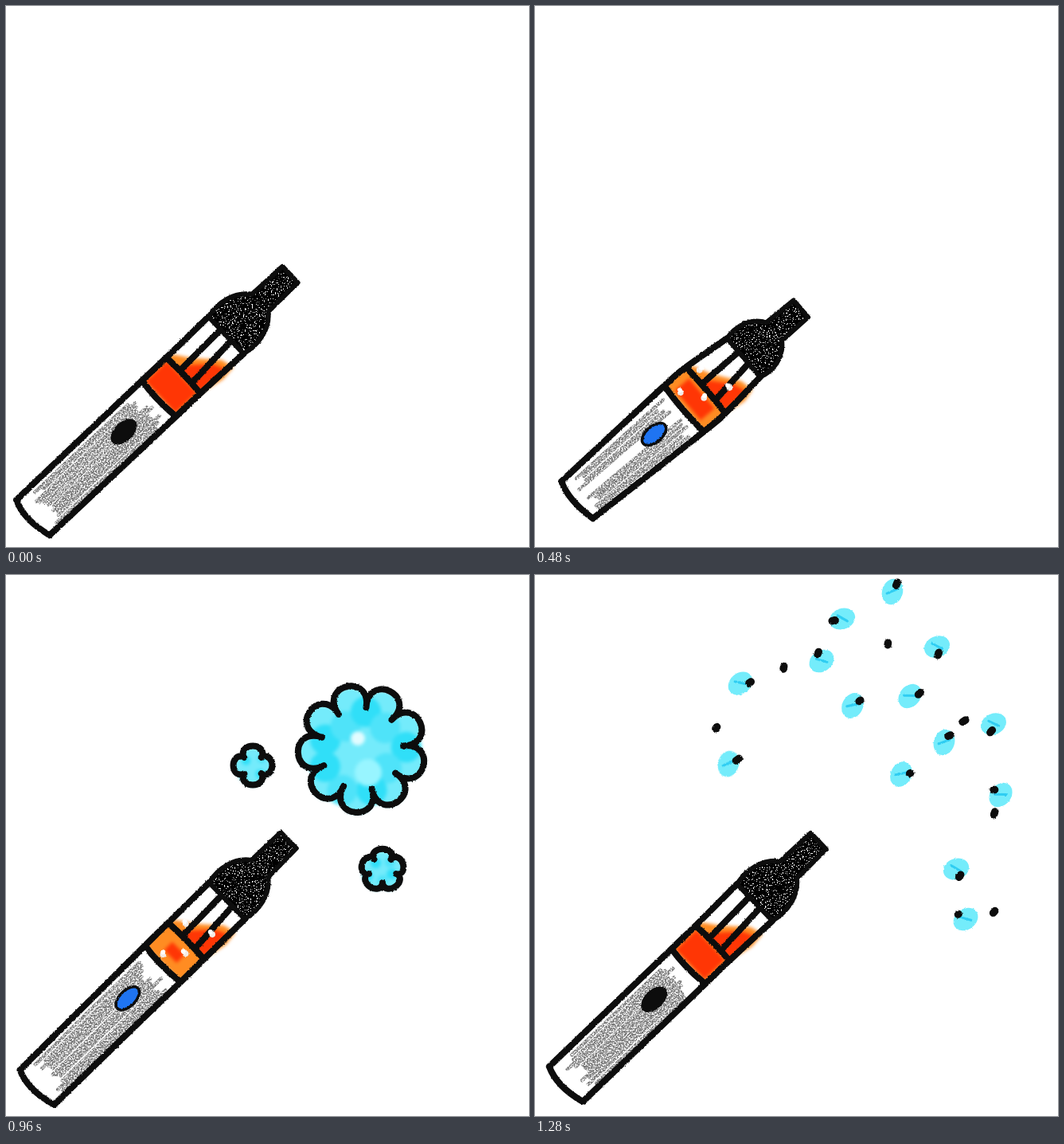
Write an HTML page that moves like this. It is 657 px wide and 679 px high and loops after 1360 ms.

```html
<!DOCTYPE html>
<html lang="en">
<head>
<meta charset="utf-8">
<title>Vape puff</title>
<style>
  html, body { margin: 0; width: 100%; height: 100%; overflow: hidden; background: #fff; }
  svg { display: block; width: 100vw; height: 100vh; }
</style>
</head>
<body>
<svg id="stage" viewBox="0 0 657 679" fill="none" stroke-linecap="round" stroke-linejoin="round"></svg>
<script>
const STEP = 80, STEPS = 17, INK = '#0d0d0d';
const stage = document.getElementById('stage');

// step, foot x y, tip x y, collar place along the pen, half width there, heat of the liquid
const poses = [
  [0, 34, 642, 357, 337, .49, 31, .88],
  [4, 39, 643, 355, 333, .5, 32, .45],
  [8, 67, 597, 313, 427, .455, 44, .85],
  [10, 52, 605, 377, 348, .41, 34, .6],
  [12, 39, 643, 355, 333, .5, 32, .35],
  [14, 41, 636, 356, 331, .485, 32, .85],
  [16, 39, 639, 356, 334, .485, 30.5, .85]
];

// Broken clouds: centre, radii, number of lobes, angle of the first notch
const shreds = [
  { x: 428, y: 135, rx: 46, ry: 62, n: 6, turn: -94 },
  { x: 515, y: 258, rx: 80, ry: 46, n: 6, turn: 215 },
  { x: 285, y: 231, rx: 30, ry: 27, n: 5, turn: -90 },
  { x: 492, y: 387, rx: 31, ry: 28, n: 5, turn: -90 }
];

const droplets = [[449, 21], [386, 55], [505, 90], [360, 108], [258, 136], [399, 164], [471, 152],
  [514, 210], [576, 187], [243, 237], [460, 250], [585, 276], [529, 369], [541, 432]];

const lerp = (a, b, t) => a + (b - a) * t;
const mix = (a, b, t) => a.map((v, i) => lerp(v, b[i], t));
const fix = n => Math.round(n * 10) / 10;
const at = p => fix(p[0]) + ' ' + fix(p[1]);
const poly = pts => 'M' + pts.map(at).join('L');
const path = (d, attrs) => `<path d="${d}" ${attrs}/>`;
const ink = (d, w = 8) => path(d, `stroke="${INK}" stroke-width="${w}"`);
const dot = (x, y, r, fill) => `<circle cx="${fix(x)}" cy="${fix(y)}" r="${fix(r)}" fill="${fill}"/>`;
const group = (body, attrs) => `<g ${attrs}>${body}</g>`;
const use = name => `filter="url(#${name})"`;
const soft = body => group(body, use('soft'));
const rough = body => group(body, use('rough'));

function polar(x, y, rx, ry, degrees) {
  const a = degrees * Math.PI / 180;
  return [x + rx * Math.cos(a), y + ry * Math.sin(a)];
}

function random(seed) {
  let s = seed * 7919 + 17;
  return () => (s = (s * 16807) % 2147483647) / 2147483647;
}

function poseAt(step) {
  const i = Math.max(1, poses.findIndex(p => p[0] >= step));
  const from = poses[i - 1], to = poses[i];
  return mix(from, to, (step - from[0]) / (to[0] - from[0])).slice(1);
}

// Point inside a four-cornered patch: u along the pen, v across it
const patch = ([a, b], [c, d]) => (u, v) => mix(mix(a, b, v), mix(c, d, v), u);

function smooth(pts) {
  let d = 'M' + at(pts[0]);
  for (let i = 0; i < pts.length - 1; i++) {
    const p = pts[i], n = pts[i + 1], prev = pts[i - 1] || p, next = pts[i + 2] || n;
    const c1 = [p[0] + (n[0] - prev[0]) / 6, p[1] + (n[1] - prev[1]) / 6];
    const c2 = [n[0] - (next[0] - p[0]) / 6, n[1] - (next[1] - p[1]) / 6];
    d += `C${at(c1)} ${at(c2)} ${at(n)}`;
  }
  return d;
}

function filters(step) {
  const area = 'filterUnits="userSpaceOnUse" x="0" y="0" width="657" height="679" color-interpolation-filters="sRGB"';
  const noise = f => `<feTurbulence type="fractalNoise" baseFrequency="${f}" numOctaves="2" seed="${step + 3}" result="n"/>`;
  const grain = (id, gain, lift) => `<filter id="${id}" ${area}>${noise(.55)}
    <feColorMatrix in="n" values="0 0 0 0 0 0 0 0 0 0 0 0 0 0 0 0 0 0 ${gain} ${lift}" result="m"/>
    <feComposite in="SourceGraphic" in2="m" operator="in"/></filter>`;
  const edge = `<filter id="rough" ${area}>${noise(.4)}
    <feDisplacementMap in="SourceGraphic" in2="n" scale="2.5" xChannelSelector="R" yChannelSelector="G"/>
    <feGaussianBlur stdDeviation=".6"/></filter>`;
  const blur = `<filter id="soft" ${area}><feGaussianBlur stdDeviation="2.2"/></filter>`;
  return '<defs>' + grain('speck', -14, 9.7) + grain('pencil', -3.5, 2.4) + edge + blur + '</defs>';
}

function hatch(body, step) {
  const rnd = random(step + 5);
  let d = '';
  for (let v = .14; v < .9; v += .075) {
    if (step > 2 && step < 12 && Math.abs(v - .48) < .08) continue;
    const slip = rnd() * .03;
    d += poly([body(.06 + rnd() * .1, v + slip), body(.5, v + slip), body(.84 + rnd() * .1, v + .02)]);
  }
  return group(path(d, 'stroke="#757575" stroke-width="4.6"'), use('pencil'));
}

function bubbles(step, ring, glass) {
  if (step < 6 || step > 12) return '';
  const rnd = random(step);
  let out = '';
  for (let i = 0; i < 4; i++) {
    const v = .15 + rnd() * .3 + (i % 2) * .4;
    const [x, y] = i < 2 ? ring(.2 + rnd() * .6, v) : glass(.1 + v * .4, v);
    out += dot(x, y, 3.8, '#f3ece8') + dot(x + 3 - rnd() * 6, y - 3, 3, '#fff');
  }
  return out;
}

function pen(step) {
  const [fx, fy, tx, ty, waist, half, heat] = poseAt(step);
  const dx = tx - fx, dy = ty - fy, len = Math.hypot(dx, dy);
  const cut = (u, w) => [-w, w].map(s => [fx + dx * u - dy / len * s, fy + dy * u + dx / len * s]);
  const above = (u, w) => cut(lerp(waist, 1, u), w);

  const foot = cut(0, 30.5), collar = cut(waist, half), band = above(.185, half), top = above(.51, 32);
  const [low, high] = [above(.6, 37), above(.71, 33)], neck = above(.77, 15), tip = above(1, 14);
  const body = patch(foot, collar), ring = patch(collar, band), glass = patch(band, top);

  const liquid = path(poly([collar[0], collar[1], band[1], glass(.45, 1.1), glass(.72, 1.06), glass(.66, .8),
    glass(.3, .35), glass(.12, .05), band[0]]) + 'Z', 'fill="#ff8c22"');
  const a = .5 - heat / 2, b = .5 + heat / 2;
  const hot = path(poly([ring(a, a), ring(a, b), ring(b, b), ring(b, a)]) + 'Z' +
    poly([glass(.03, .3), glass(.03, .97), glass(.6, .98), glass(.5, .74), glass(.22, .45)]) + 'Z', 'fill="#ff3605"');

  const curve = (i, from, c1, c2, to) => `C${at(c1[i])} ${at(c2[i])} ${at(to[i])}`;
  const mouth = 'M' + at(top[0]) + curve(0, top, low, high, neck) + 'L' + at(tip[0]) + 'L' + at(tip[1]) +
    'L' + at(neck[1]) + curve(1, neck, high, low, top) + 'Z';
  const bow = ([p, q], mid) => `M${at(p)}Q${at(mid)} ${at(q)}`;
  const sides = [0, 1].map(i => smooth([foot[i], collar[i], band[i], top[i]])).join('');
  const seams = bow(foot, body(-.05, .4)) + bow(collar, body(.98, .45)) + bow(band, glass(.03, .55));
  const tube = poly([glass(.97, .35), glass(.02, .38)]) + poly([glass(.97, .65), glass(.02, .73)]);

  const angle = Math.atan2(dy, dx) * 180 / Math.PI;
  const button = `<ellipse rx="18" ry="10" transform="translate(${at(body(.72, .5))}) rotate(${fix(angle)})"
    fill="${step > 1 && step < 14 ? '#1f74f2' : INK}" stroke="${INK}" stroke-width="3.5"/>`;

  return hatch(body, step) + soft(liquid + hot) + group(path(mouth, 'fill="#000"'), use('speck')) +
    rough(ink(sides + seams + tube) + ink(mouth, 6) + button + bubbles(step, ring, glass));
}

// Evenly spaced lobes around an ellipse, each as its own arc from notch to notch
function lobes({ x, y, rx, ry, n, turn }, height) {
  return Array.from({ length: n }, (_, i) => {
    const p = polar(x, y, rx, ry, turn + i * 360 / n);
    const q = polar(x, y, rx, ry, turn + (i + 1) * 360 / n);
    const dx = q[0] - p[0], dy = q[1] - p[1], out = height * 4 / 3, flare = height * .3;
    const c1 = [p[0] + dy * out - dx * flare, p[1] - dx * out - dy * flare];
    const c2 = [q[0] + dy * out + dx * flare, q[1] - dx * out + dy * flare];
    return { start: 'M' + at(p), arc: `C${at(c1)} ${at(c2)} ${at(q)}`, notch: poly([p, mix(p, [x, y], .1)]) };
  });
}

function cloud(shape, height) {
  const { x, y, rx, ry, n, turn } = shape, parts = lobes(shape, height), rnd = random(n);
  const edge = parts[0].start + parts.map(p => p.arc).join('') + 'Z';
  let wash = path(edge, 'fill="#74ebfb"');
  for (let i = 0; i < n; i++) {
    const k = .6 + rnd() * .4;
    wash += dot(...polar(x, y, rx * k, ry * k, turn + i * 360 / n), rx * .33, i % 2 ? '#4fe3f9' : '#30dff8');
  }
  if (n > 6) wash += dot(x - 5, y - 15, 9, '#e2fcff') + dot(x + 8, y + 28, 17, '#98f5ff');
  return soft(group(wash, 'transform="translate(0 2)"')) + rough(ink(edge + parts.map(p => p.notch).join('')));
}

function puffs(t) {
  const size = lerp(27, 58, t), big = t > 0;
  let out = cloud({ x: lerp(415, 447, t), y: lerp(306, 218, t), rx: size * lerp(1.14, 1, t), ry: size * lerp(.84, 1, t),
    n: big ? 9 : 5, turn: big ? 196 : 228 }, .65);
  const left = [lerp(343, 310, t), lerp(299, 239, t)], right = [lerp(437, 473, t), lerp(362, 370, t)];
  if (big) {
    out += cloud({ x: left[0], y: left[1], rx: 17 * t, ry: 16 * t, n: 4, turn: -135 }, .55);
    out += cloud({ x: right[0], y: right[1], rx: 20 * t, ry: 18 * t, n: 5, turn: -126 }, .5);
  } else if (t === 0) {
    out += soft(dot(443, 359, 14, '#4fe4fa')) + rough(dot(...left, 7.5, INK) + ink(poly([[421, 364], right])) +
      ink('M430 364Q438 354 448 361Q440 372 430 364', 6));
  }
  return out;
}

// Clouds falling apart: a wash open at the top and arcs trimmed to the given share
function scatter(scale, show) {
  const dash = share => `pathLength="1" stroke-dasharray="0 ${(1 - share) / 2} ${share} 2"`;
  const body = shreds.map(s => {
    const { x, y, rx, ry } = s, r = [rx * .72, ry * .74];
    const from = polar(x, y, ...r, -52), to = polar(x, y, ...r, 232);
    const wash = path(`M${at(from)}A${r.map(fix).join(' ')} 0 1 1 ${at(to)}`, `stroke="#82f0fd" stroke-width="24" ${dash(show)}`);
    const spots = [from, to].map(p => dot(...p, 14 * show, '#3eddf6')).join('');
    const arcs = lobes(s, .3).map(p => path(p.start + p.arc, `stroke="${INK}" stroke-width="7.5" ${dash(show * .82)}`));
    return soft(wash + spots) + rough(arcs.join(''));
  }).join('');
  return group(body, `transform="translate(410 260) scale(${scale}) translate(-410 -260)"`);
}

function spray() {
  const rnd = random(4);
  const nib = (x, y) => ink(`M${fix(x - 1)} ${fix(y + 1)}l${fix(rnd() * 4)} ${fix(-rnd() * 4)}`, 9.5);
  let wash = '', dots = '';
  for (const [x, y] of droplets) {
    wash += group('<ellipse rx="13" ry="16.5" fill="#74ecfb"/>' + path('M-6 4L5 -5', 'stroke="#2fcdf2" stroke-width="3"'),
      `transform="translate(${x} ${y}) rotate(${Math.round(rnd() * 70)})"`);
    dots += nib(...polar(x, y, 12, 10, rnd() * 360));
  }
  for (let i = 0; i < 6; i++) {
    const reach = 170 + rnd() * 110;
    dots += nib(...polar(356, 334, reach, reach, lerp(-132, 22, i / 5)));
  }
  return rough(wash + dots);
}

function flicks() {
  const strokes = [-105, -48, 8].map(a => poly([polar(313, 425, 30, 30, a), polar(313, 425, 44, 44, a + 8)]));
  return rough(ink(strokes.join('')));
}

function vapour(step) {
  if (step < 8) return '';
  if (step === 8) return flicks();
  if (step < 13) return puffs((step - 10) / 2);
  if (step < 16) return scatter(1 + (step - 14) * .1, step === 15 ? .5 : 1);
  return spray();
}

let shown = -1;
function render(ms) {
  const step = Math.floor(ms / STEP) % STEPS;
  if (step === shown) return;
  shown = step;
  stage.innerHTML = filters(step) + pen(step) + vapour(step);
}

const start = performance.now();
function tick() {
  render(Math.max(0, performance.now() - start));
  requestAnimationFrame(tick);
}
tick();
</script>
</body>
</html>
```
